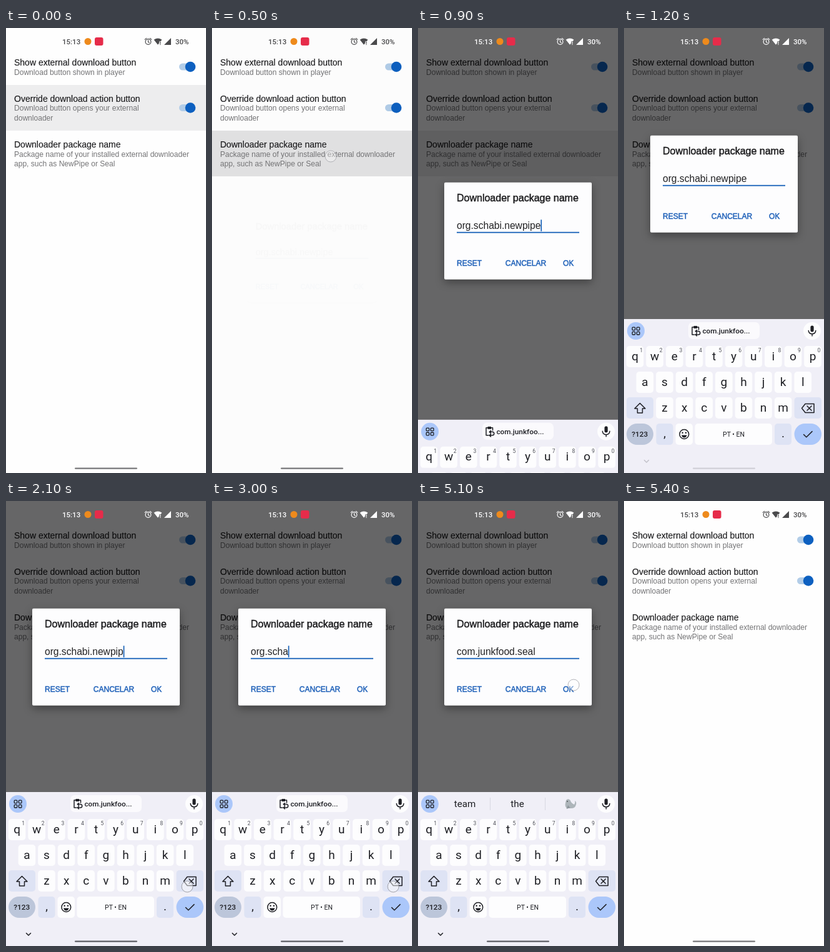
An HTML page for the animation above (5500 ms loop, 320 by 711 pixels).

```html
<!DOCTYPE html>
<html lang="en">
<head>
<meta charset="utf-8">
<title>Downloader settings</title>
<style>
html, body { margin: 0; width: 100%; height: 100%; overflow: hidden; background: #fefefe; }
svg { display: block; width: 100vw; height: 100vh; }
text { font-family: "Liberation Sans", Arial, sans-serif; white-space: pre; }
.title { font-size: 14px; fill: #1b1b1d; stroke: #1b1b1d; stroke-width: .15; }
.sub { font-size: 12.05px; fill: #747476; }
.head { font-size: 16px; fill: #1b1b1d; stroke: #1b1b1d; stroke-width: .45; }
.input { font-size: 15.6px; fill: #222224; }
.btn { font-size: 12px; fill: #1c5fb8; stroke: #1c5fb8; stroke-width: .45; }
#status text, #kb text { font-family: Roboto, sans-serif; }
#status text { font-size: 11.5px; font-weight: 500; fill: currentColor; }
#kb text { fill: #1e1f24; text-anchor: middle; }
#kb .key { font-size: 19px; }
#kb .hint { font-size: 8.5px; fill: #4c4e57; }
#kb .word { font-size: 15.2px; }
.line { fill: none; stroke: #1e1f24; stroke-width: 1.5; stroke-linejoin: round; stroke-linecap: round; }
#scrim { mix-blend-mode: multiply; }
#dialog { filter: drop-shadow(0 5px 7px rgba(0,0,0,.35)); }
</style>
</head>
<body>
<svg viewBox="0 0 320 711" preserveAspectRatio="none">
  <rect width="320" height="711" fill="#fefefe"/>
  <rect id="row2" y="91" width="320" height="73" fill="#ededee"/>
  <rect id="row3" y="164" width="320" height="73" fill="#e2e2e3"/>
  <g id="page"></g>
  <rect x="110" y="702.4" width="100" height="2.4" rx="1.2" fill="#777779"/>
  <rect id="scrim" width="320" height="711" fill="#666667"/>

  <g id="status">
    <text x="90" y="25.6">15:13</text>
    <circle cx="131" cy="21.5" r="5.5" fill="#ee8a1c"/>
    <rect x="142" y="15" width="13.5" height="13" rx="3" fill="#e62c4a"/>
    <g fill="none" stroke="currentColor" stroke-width="1.2" stroke-linecap="round">
      <circle cx="227.5" cy="22" r="4.4"/>
      <path d="M227.5 19.6V22.2L229.3 23.4M222.2 18.4L224.6 16.4M232.8 18.4L230.4 16.4"/>
    </g>
    <g fill="currentColor">
      <path d="M236.6 18.7Q243 14.4 249.4 18.7L247.3 21.4H245V24.3L243 26.8Z"/>
      <path d="M246.2 22.3h1.3v2.6h-1.3zM246.2 25.8h1.3v1.2h-1.3z"/>
      <path d="M253 27L264 16V27Z"/>
    </g>
    <text x="271" y="25.6">30%</text>
  </g>

  <g id="dialog">
    <rect x="42" width="236" height="155" rx="2" fill="#fdfdfe"/>
    <text class="head" x="62" y="30">Downloader package name</text>
    <text class="input" id="input" x="62" y="74"></text>
    <rect id="caret" y="59.5" width="1.7" height="18.5" fill="#1560b8"/>
    <rect x="62" y="79" width="196" height="1.8" fill="#1560b8"/>
    <text class="btn" x="62" y="133">RESET</text>
    <text class="btn" x="139.8" y="133">CANCELAR</text>
    <text class="btn" x="232" y="133">OK</text>
  </g>

  <g id="kb">
    <rect y="465" width="320" height="250" fill="#f0eff7"/>
    <g id="keys"></g>
    <circle cx="19" cy="484" r="14" fill="#abc7fa"/>
    <g id="grid"></g>
    <circle cx="301" cy="484" r="14" fill="#fdfdfe"/>
    <rect x="298.4" y="475.5" width="5.2" height="10" rx="2.6" fill="#1e1f24"/>
    <path class="line" d="M295.2 483.4Q295.6 488.6 301 488.8Q306.4 488.6 306.8 483.4M301 489V492"/>
    <g id="chip">
      <rect x="103" y="470" width="114" height="27" rx="7" fill="#fbfafd"/>
      <path class="line" d="M113 490H109V478H111.5M117 478H119.5V482"/>
      <path d="M111.5 476H117V480H111.5Z" fill="#1e1f24"/>
      <path class="line" d="M116 484.5H119A2.4 2.4 0 0 1 119 490H114.5M116.5 482.5L114.3 484.5L116.5 486.5M116.500 488L114.300 490L116.500 492"/>
      <text x="163.5" y="487.7" font-size="11.8" font-weight="500">com.junkfoo...</text>
    </g>
    <g id="words">
      <text class="word" x="75" y="489">team</text>
      <text class="word" x="159" y="489">the</text>
      <path d="M115.5 474V494M203.5 474V494" stroke="#d8d8e2"/>
      <path d="M237 478Q240 474.5 243.5 478Q245 483 250 485Q252 482 251 479Q254.5 481 252.5 486Q251.5 491 245 491H238Q234.5 488 236 482Z" fill="#adb5ba"/>
      <path d="M240 486L237.5 492L243.5 490Z" fill="#8d969c"/>
      <circle cx="239" cy="480" r=".9" fill="#4c5054"/>
    </g>
    <g id="nav">
      <path class="line" stroke-width="1.3" d="M32.5 690.5L36 694L39.5 690.5"/>
      <rect x="110" y="702.4" width="100" height="2.4" rx="1.2" fill="#5c5d64"/>
    </g>
  </g>

  <circle id="touch" r="9" fill="#fdfdfe" fill-opacity=".5" stroke="#85868e" stroke-opacity=".75" stroke-width="1"/>
</svg>
<script>
const LOOP = 5500;
const OLD = "org.schabi.newpipe", NEW = "com.junkfood.seal";
const PASTE = 4150, FIRST_DELETE = 1950, REPEAT = 2350, STEP = 76;
const CLEARED = REPEAT + (OLD.length - 2) * STEP;
const $ = id => document.getElementById(id);
const clamp = v => Math.max(0, Math.min(1, v));
const ramp = (t, a, b) => clamp((t - a) / (b - a));
const ease = p => 1 - (1 - p) ** 3;
const show = (id, o) => $(id).setAttribute("opacity", o);
const text = (cls, x, y, s) => `<text class="${cls}" x="${x}" y="${y}">${s}</text>`;
const rect = (x, y, w, h, r, fill) =>
  `<rect x="${x}" y="${y}" width="${w}" height="${h}" rx="${r}" fill="${fill}"/>`;
const line = d => `<path class="line" d="${d}"/>`;

function toggle(y) {
  return rect(277, y - 5.5, 25, 11, 5.5, "#b2cde8") +
    `<circle cx="295" cy="${y}" r="8.3" fill="#0d60c0"/>`;
}

function buildPage() {
  $("page").innerHTML =
    text("title", 13, 60, "Show external download button") +
    text("sub", 13, 74.5, "Download button shown in player") +
    text("title", 13, 117.5, "Override download action button") +
    text("sub", 13, 132.3, "Download button opens your external") +
    text("sub", 13, 148, "downloader") +
    text("title", 13, 190.5, "Downloader package name") +
    text("sub", 13, 205.8, "Package name of your installed external downloader") +
    text("sub", 13, 221.2, "app, such as NewPipe or Seal") +
    toggle(62) + toggle(127.5);
}

function buildKeys() {
  const white = "#fdfdfe", gray = "#dee3f4", blue = "#abc7fa", pitch = 31.6;
  const rows = [["qwertyuiop", 17.6, 525], ["asdfghjkl", 33.4, 566], ["zxcvbnm", 65, 607]];
  let out = "";
  for (const [letters, x0, y] of rows)
    [...letters].forEach((c, i) => {
      const x = x0 + i * pitch;
      out += rect(x - 13.8, y - 17, 27.6, 34, 5, white) + text("key", x, y + 5.5, c);
      if (y === 525) out += text("hint", x + 10, y - 7, (i + 1) % 10);
    });
  out += rect(4, 590, 43, 34, 5, gray) + rect(272.5, 590, 43.5, 34, 5, gray);
  out += line("M25.5 599.5L34 608H29.5V615H21.5V608H17Z");
  out += line("M290 600.5H304V614.5H290L284.5 607.5ZM293 604L300 611M300 604L293 611");

  out += rect(4, 632, 43, 34, 17, "#bcc6da") + rect(51.5, 632, 27, 34, 5, gray) +
    rect(82.5, 632, 27.5, 34, 5, white) + rect(113.5, 632, 123.5, 34, 5, white) +
    rect(241, 632, 27, 34, 5, gray) + rect(272.5, 632, 43.5, 34, 17, blue);
  out += `<text x="25.3" y="653.2" font-size="11.8" font-weight="500">?123</text>` +
    `<text x="175.5" y="652.8" font-size="10.5">PT • EN</text>`;
  out += text("key", 65, 654, ",") + text("key", 254.5, 654, ".");
  out += `<circle class="line" cx="96.3" cy="649" r="7.4"/>` +
    `<path d="M92 650.5H100.6Q99.5 654.5 96.3 654.5Q93 654.5 92 650.5Z" fill="#1e1f24"/>` +
    `<circle cx="93.6" cy="646.7" r="1.2" fill="#1e1f24"/><circle cx="99" cy="646.7" r="1.2" fill="#1e1f24"/>`;
  out += line("M287.5 649.5L291.8 653.8L301 644.6");
  $("keys").innerHTML = out;

  $("grid").innerHTML = [13.2, 20.4].map(x => [478.2, 485.4].map(y =>
    `<rect class="line" x="${x}" y="${y}" width="4.6" height="4.6" rx="1" style="stroke-width:1.3"/>`
  ).join("")).join("");
}

function deleted(t) {
  if (t < FIRST_DELETE) return 0;
  return Math.min(OLD.length, 1 + (t < REPEAT ? 0 : 1 + Math.floor((t - REPEAT) / STEP)));
}

// Start of the current caret blink cycle
function blinkStart(t) {
  if (t >= PASTE) return PASTE;
  if (t < FIRST_DELETE) return 600;
  if (t < REPEAT) return FIRST_DELETE;
  return Math.min(t, CLEARED);
}

const taps = [
  { x: 190, y: 205, from: 350, to: 450 },
  { x: 290, y: 616, from: 1900, to: CLEARED + 40 },
  { x: 190, y: 480, from: 4000, to: 4130 },
  { x: 249, y: 294, from: 4960, to: 5070 }
];

function drawTouch(t) {
  const tap = taps.find(p => t >= p.from && t < p.to + 170);
  show("touch", tap ? ramp(t, tap.from - 30, tap.from + 40) * (1 - ramp(t, tap.to, tap.to + 170)) : 0);
  if (tap) $("touch").setAttribute("transform", `translate(${tap.x} ${tap.y})`);
}

function draw(t) {
  show("row2", 1 - ramp(t, 60, 300));
  show("row3", ramp(t, 370, 480) * (1 - ramp(t, 800, 1050)));

  const open = ease(ramp(t, 500, 700)) * (1 - ramp(t, 5140, 5330));
  show("scrim", open);
  $("status").setAttribute("color", open > .45 ? "#fdfdfe" : "#4a4a4c");

  const lift = ease(ramp(t, 860, 1160));
  const y = 288.3 - 116.5 * lift;
  const size = t < 1000 ? .92 + .08 * open : 1;
  show("dialog", open);
  $("dialog").setAttribute("transform",
    `translate(160 ${y + 77.5}) scale(${size}) translate(-160 -77.5)`);

  $("input").textContent = t >= PASTE ? NEW : OLD.slice(0, OLD.length - deleted(t));
  const end = $("input").textContent ? $("input").getComputedTextLength() : 0;
  $("caret").setAttribute("x", 62 + end);
  show("caret", Math.floor((t - blinkStart(t)) / 500) % 2 ? 0 : 1);

  const rise = lift * (1 - ramp(t, 5160, 5370) ** 2);
  $("kb").setAttribute("transform", `translate(0 ${250 * (1 - rise)})`);
  show("kb", rise > 0 ? 1 : 0);
  show("nav", .1 + .9 * ramp(t, 1180, 1350));
  show("chip", 1 - ramp(t, 4090, 4180));
  show("words", ramp(t, 4330, 4420));
  drawTouch(t);
}

buildPage();
buildKeys();
const began = performance.now();
function tick() {
  draw((performance.now() - began) % LOOP);
  requestAnimationFrame(tick);
}
tick();
</script>
</body>
</html>
```
